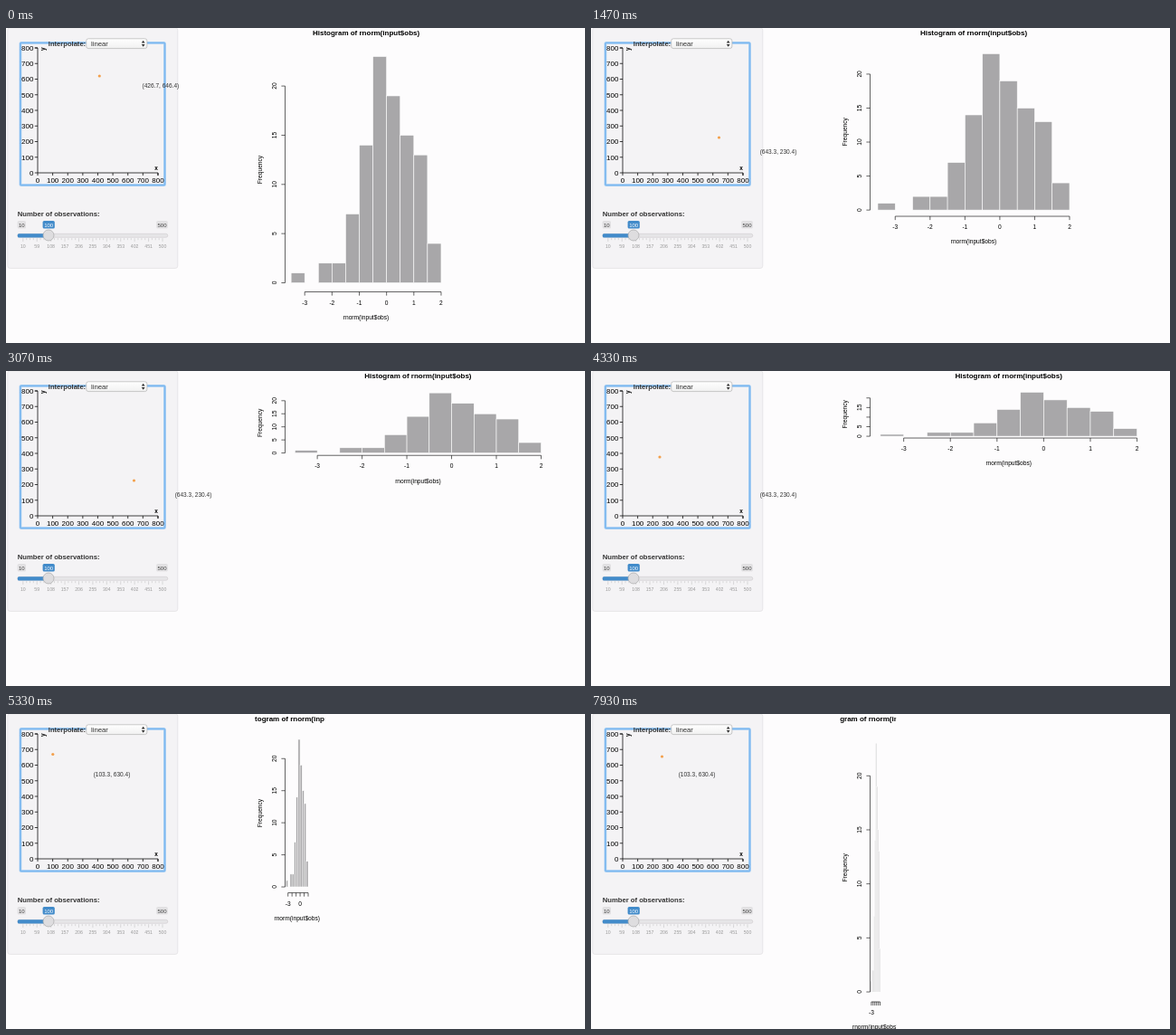
Recreate the animation shown at these times as an HTML page. Size 640 by 348 pixels, loop 8000 ms.

```html
<!DOCTYPE html>
<html lang="en">
<head>
<meta charset="utf-8">
<title>Histogram resizing</title>
<style>
  html, body { margin: 0; width: 100%; height: 100%; overflow: hidden; background: #fdfcfd; }
  svg { display: block; }
  text { font-family: "Liberation Sans", Arial, sans-serif; white-space: pre; }
</style>
</head>
<body>
<svg id="stage" width="640" height="348" viewBox="0 0 640 348">
  <defs>
    <linearGradient id="shade" x1="0" y1="0" x2="0" y2="1">
      <stop offset="0" stop-color="#fff"/><stop offset="1" stop-color="#f1f1f1"/>
    </linearGradient>
  </defs>
  <svg id="plot" x="275" y="0" height="348"></svg>
  <rect x="1.8" y="-.2" width="188" height="265.6" rx="2.5" fill="#f4f3f5" stroke="#e0dfe1" stroke-width=".7"/>
  <rect x="15.9" y="16.4" width="159.6" height="157.2" rx="1" fill="none" stroke="#b9d8f5" stroke-width="3"/>
  <rect x="15.9" y="16.4" width="159.6" height="157.2" rx="1" fill="none" stroke="#7fb9ef" stroke-width="1.8"/>
  <g id="panel"></g>
  <rect x="88.7" y="11.8" width="67.2" height="10.8" rx="2.4" fill="url(#shade)" stroke="#b4b4b4" stroke-width=".7"/>
  <path d="M149.8 16.4l1.9-2.7 1.9 2.7zM149.8 18l1.9 2.7 1.9-2.7z" fill="#333"/>
  <g id="slider"></g>
  <circle id="dot" r="1.6" fill="#f3a04c"/>
  <g id="label"></g>
</svg>
<script>
const LOOP = 8000, FRAME = 200 / 3;
const $ = id => document.getElementById(id);

function add(parent, tag, attrs, content) {
  const el = document.createElementNS('http://www.w3.org/2000/svg', tag);
  for (const k in attrs) el.setAttribute(k, attrs[k]);
  if (content !== undefined) el.textContent = content;
  parent.appendChild(el);
  return el;
}
const text = (parent, str, x, y, size, extra) =>
  add(parent, 'text', { x, y, 'font-size': size, 'text-anchor': 'middle', ...extra }, str);
const upright = (parent, str, x, y, size, extra) =>
  text(parent, str, 0, 0, size, { transform: `translate(${x} ${y}) rotate(-90)`, ...extra });
const line = (parent, d, stroke = '#111', width = .65) =>
  add(parent, 'path', { d, fill: 'none', stroke, 'stroke-width': width });

function drawPanel() {
  const g = $('panel'), start = { 'text-anchor': 'start' }, bold = { 'font-weight': 700 };
  let d = 'M31.8 22H35V160H168V163';
  for (let i = 0; i <= 8; i++) {
    const x = 35 + i * 16.62, y = 160 - i * 17.25;
    d += `M31.8 ${y}H35M${x} 160V163`;
    text(g, i * 100, x, 171, 8, {});
    text(g, i * 100, 30.4, y + 2.9, 8, { 'text-anchor': 'end' });
  }
  line(g, d, '#000', .75);
  text(g, 'x', 166, 157, 6.5, bold);
  upright(g, 'y', 42.6, 23.2, 6.5, bold);
  text(g, 'Interpolate:', 46.8, 19.7, 7.6, { ...start, ...bold, fill: '#333' });
  text($('slider'), 'linear', 94, 19.7, 7.75, { ...start, fill: '#333' });
  text(g, 'Number of observations:', 12.7, 207.6, 7.68, { ...start, ...bold, fill: '#333' });
}

function drawSlider() {
  const g = $('slider');
  const badge = (str, x, width, fill, color) => {
    add(g, 'rect', { x, y: 213, width, height: 8.6, rx: 1.6, fill });
    text(g, str, x + width / 2, 219.5, 6, { fill: color });
  };
  badge('10', 12.6, 9.4, '#e1e0e2', '#444');
  badge('500', 166.2, 12.6, '#e1e0e2', '#444');
  badge('100', 40.6, 13.2, '#428bca', '#fff');
  add(g, 'rect', { x: 12.8, y: 227.3, width: 166, height: 4, rx: 2, fill: '#e6e5e7', stroke: '#c6c5c7', 'stroke-width': .5 });
  add(g, 'rect', { x: 12.8, y: 227.2, width: 34, height: 4.2, rx: 1.5, fill: '#428bca' });
  let d = '';
  for (let i = 0; i <= 40; i++) d += `M${18.8 + i * 3.855} 232.2v${i % 4 ? 2 : 3.8}`;
  line(g, d, '#bbb', .5);
  for (let i = 0; i <= 10; i++) text(g, 10 + 49 * i, 18.8 + i * 15.42, 243, 5.2, { fill: '#999' });
  add(g, 'circle', { cx: 47, cy: 229, r: 6, fill: '#dedddf', stroke: '#a9a9ab', 'stroke-width': .7 });
}

const COUNTS = [1, 0, 2, 2, 7, 14, 23, 19, 15, 13, 4];
const LEFT = 33.5, TOP = 21.5, EM = 6.65;

// Axis labels are skipped when closer than one "m" to the last one drawn.
function spaced(ticks, pos) {
  let end = -Infinity;
  return ticks.filter(v => {
    const half = (Math.abs(v) > 9 ? .556 : v < 0 ? .445 : .278) * EM, p = pos(v);
    if (p - half < end + .833 * EM) return false;
    end = p + half;
    return true;
  });
}

function drawPlot(right, bottom) {
  const g = $('plot'), r = right - 275, w = r - LEFT, h = bottom - TOP;
  g.replaceChildren();
  g.setAttribute('width', r + 17.2);
  const px = v => LEFT + w * (.04 + (v + 3.5) / 5.5) / 1.08;
  const py = v => bottom - h * (.04 + v / 23) / 1.08;
  COUNTS.forEach((n, i) => {
    const x = px(i / 2 - 3.5);
    if (n) add(g, 'rect', {
      x, y: py(n), width: px(i / 2 - 3) - x, height: py(0) - py(n),
      fill: '#a8a7a9', stroke: '#fff', 'stroke-width': .57
    });
  });
  const xs = [-3, -2, -1, 0, 1, 2], ys = [0, 5, 10, 15, 20];
  line(g, `M${px(-3)} ${bottom}H${px(2)}M${LEFT} ${py(0)}V${py(20)}`
    + xs.map(v => `M${px(v)} ${bottom}v4.1`).join('')
    + ys.map(v => `M${LEFT} ${py(v)}h-4.1`).join(''));
  spaced(xs, px).forEach(v => text(g, v, px(v), bottom + 14.2, EM));
  spaced(ys, v => -py(v)).forEach(v => upright(g, v, LEFT - 9.2, py(v), EM));
  const mid = LEFT + w / 2;
  text(g, 'Histogram of rnorm(input$obs)', mid, 7.9, 8, { 'font-weight': 700 });
  text(g, 'rnorm(input$obs)', mid, bottom + 30.4, EM);
  upright(g, 'Frequency', LEFT - 25.5, TOP + h / 2, EM);
}

// time, right edge, bottom edge of the plot region
const SIZE = [
  [70, 487.6, 291.5], [870, 503.7, 258], [1000, 506, 254], [1330, 529.2, 218], [1467, 537.5, 208],
  [1733, 551.5, 186], [1933, 553.6, 183], [2133, 562.4, 170], [2330, 566, 160], [2933, 591.5, 105],
  [3067, 602.4, 93.2], [3133, 608, 82], [3333, 615, 74], [4333, 615, 74], [5200, 396, 159],
  [5333, 335, 197.5], [5700, 319, 240], [6067, 316.5, 271], [6333, 315.2, 286], [6933, 316, 325],
  [7200, 316, 325], [7933, 320, 318]
];
// time, x, y of the dragged point
const DRAG = [
  [70, 103.3, 53], [870, 133, 106], [1000, 133, 106], [1330, 141.5, 121], [3470, 141.5, 121],
  [4333, 76, 95], [4670, 57.5, 83], [4930, 51.8, 56.5], [5200, 51.8, 44.5], [6970, 51.8, 44.5],
  [7133, 55, 44.8], [7200, 55, 44.8], [7933, 78.5, 47]
];
// time, reported coordinates
const REPORTS = [[0, 426.7, 646.4], [1130, 643.3, 230.4], [5000, 103.3, 630.4]];

function sample(keys, t) {
  const i = keys.findIndex(k => k[0] >= t);
  if (i === 0) return keys[0].slice(1);
  if (i < 0) return keys[keys.length - 1].slice(1);
  const a = keys[i - 1], b = keys[i], f = (t - a[0]) / (b[0] - a[0]);
  return [1, 2].map(k => a[k] + (b[k] - a[k]) * f);
}

drawPanel();
drawSlider();
const dot = $('dot');
const label = text($('label'), '', 0, 0, 6.55, { fill: '#333' });
let shown = '';

function render(now) {
  const t = Math.floor((now % LOOP) / FRAME + .1) * FRAME;
  const size = sample(SIZE, t);
  if (shown !== size.join()) {
    shown = size.join();
    drawPlot(...size);
  }
  const [x, y] = sample(DRAG, t);
  dot.setAttribute('cx', x);
  dot.setAttribute('cy', y);
  const [, u, v] = REPORTS.filter(r => r[0] <= t).pop();
  label.textContent = `(${u}, ${v})`;
  label.setAttribute('x', 99.8 + u / 6);
  label.setAttribute('y', 179.6 - v * .175);
}

const begin = performance.now();
function tick() {
  render(performance.now() - begin);
  requestAnimationFrame(tick);
}
tick();
</script>
</body>
</html>
```
